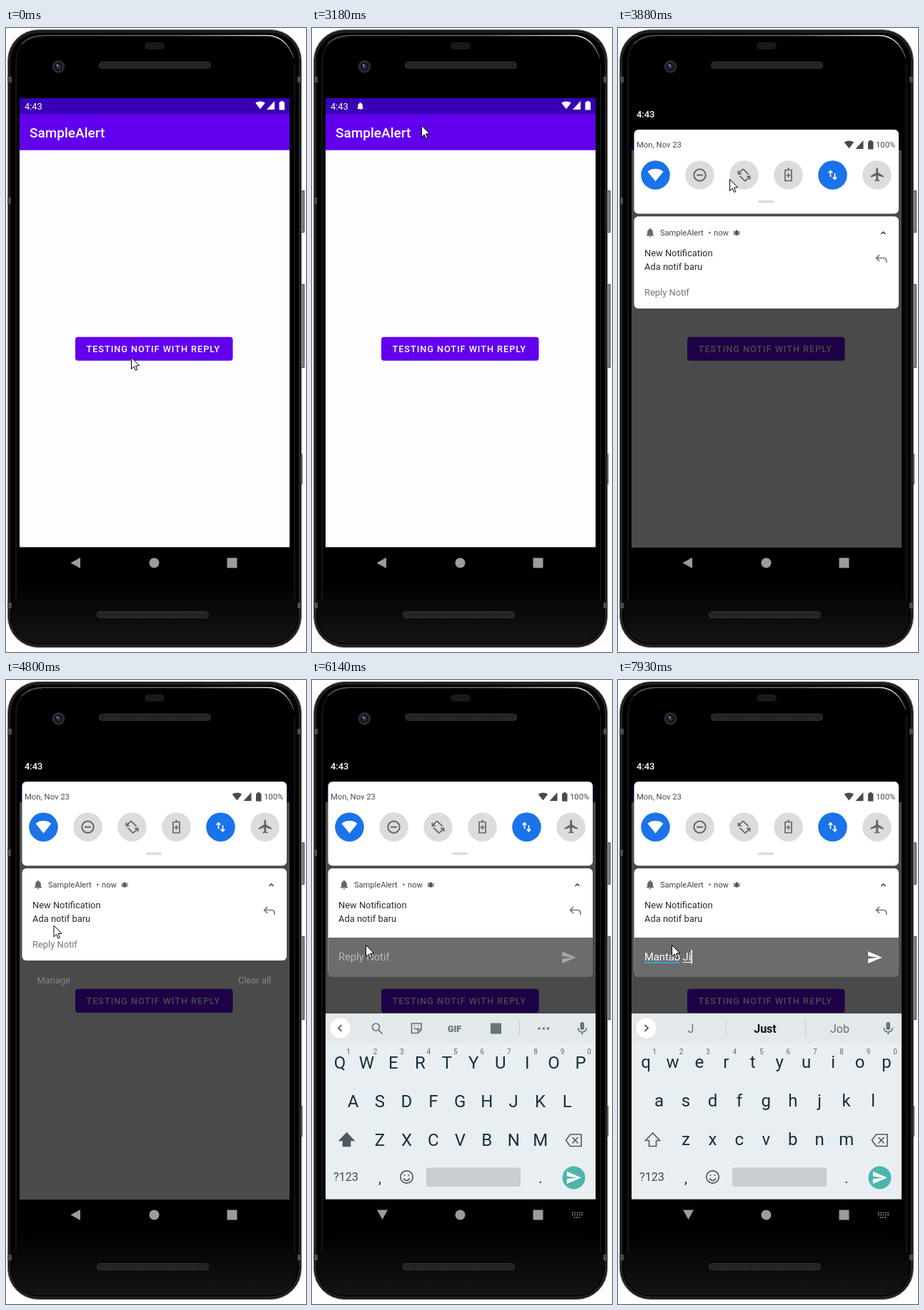
Recreate the animation shown at these times as an HTML page. Size 420x872 px, loop 8 s.

```html
<!DOCTYPE html>
<html lang="en">
<head>
<meta charset="utf-8">
<title>Notification with reply</title>
<style>
html, body { margin: 0; width: 100%; height: 100%; overflow: hidden; background: #fefefe; }
svg { display: block; width: 420px; height: 872px; font-family: Roboto, sans-serif; }
text { white-space: pre; }
.mid { text-anchor: middle; }
.line { fill: none; stroke-width: 2; }
.b13 { font-size: 12.9px; }
.b11 { font-size: 11.1px; }
</style>
</head>
<body>
<svg viewBox="0 0 420 872">
<defs>
  <path id="wifi" d="M12 21L23.6 6.6C20 3.6 16 2.5 12 2.5S4 3.6.4 6.6z"/>
  <path id="bell" d="M12 22a2 2 0 0 0 2-2h-4a2 2 0 0 0 2 2zm6-6v-5c0-3-1.6-5.6-4.5-6.3V4a1.5 1.5 0 0 0-3 0v.7C7.6 5.4 6 8 6 11v5l-2 2v1h16v-1z"/>
  <path id="send" d="M2 21L23 12 2 3v7l15 2-15 2z"/>
  <path id="plane" d="M21 16v-2l-8-5V3.5a1.5 1.5 0 0 0-3 0V9l-8 5v2l8-2.5V19l-2 1.5V22l3.5-1 3.5 1v-1.5L13 19v-5.5z"/>
  <path id="rotate" d="M4 7.600l5-5q1.400-1.200 2.800 0L20.200 11h-2.800l-7-7-5 5H8v2H2V5h2zM20 16.400V19h2v-6h-6v2h2.600l-5 5-7-7H3.800l8.400 8.400q1.400 1.200 2.800 0z"/>
  <g id="status">
    <use href="#wifi" transform="translate(349 101) scale(.58)"/>
    <path d="M365 114h11v-12z"/>
    <path d="M382.5 103.500h2V102h3.500v1.500h2V114.500h-7.500z"/>
  </g>
  <clipPath id="screenClip"><rect x="19" y="98" width="378" height="627.500"/></clipPath>
  <clipPath id="buttonClip"><rect x="97" y="431.700" width="220.500" height="33" rx="4"/></clipPath>
  <clipPath id="revealClip"><circle id="reveal" cx="75" cy="380"/></clipPath>
  <linearGradient id="topShade" x2="0" y2="1">
    <stop offset=".65"/><stop offset="1" stop-opacity=".3"/>
  </linearGradient>
  <linearGradient id="chin" x2="0" y2="1">
    <stop offset="0"/><stop offset="1" stop-color="#141414"/>
  </linearGradient>
  <linearGradient id="shine">
    <stop offset="0" stop-color="#555"/><stop offset=".6" stop-color="#777"/><stop offset=".95" stop-color="#eee"/><stop offset="1" stop-color="#444"/>
  </linearGradient>
  <pattern id="mesh" width="3" height="3" patternUnits="userSpaceOnUse">
    <rect width="3" height="3" fill="#2b2b2b"/><circle cx="1.500" cy="1.500" r="1" fill="#151515"/>
  </pattern>
</defs>

<g id="phone">
  <path d="M413 227.500h4.500v58H413zM413 358.500h4.500v116H413z" fill="#858585" stroke="#4a4a4a"/>
  <path d="M413 595h2v43h-2z" fill="#444"/>
  <rect x="2.500" y="2.500" width="411" height="863" rx="43" fill="#1b1b1b" stroke="#6a6a6a"/>
  <rect x="5.500" y="6" width="405" height="856" rx="40" stroke="#2e2e2e"/>
  <rect x="8" y="770" width="400" height="90" rx="37" fill="url(#chin)"/>
  <path d="M14 800V50Q14 12 50 12M404 800V50" fill="none" stroke="#151515" stroke-width="2"/>
  <path d="M22 22Q34 10.500 52 10.500H366Q392 11 403 42" fill="none" stroke="url(#shine)" stroke-width="1.300"/>
  <path d="M2 68h6v8H2zM408 68h6v8h-6zM2 237h5v9H2zM2 803h6v8H2zM408 803h6v8h-6z" fill="#4b4b4b"/>
  <rect x="194" y="20" width="28" height="10" rx="5" fill="#191919"/>
  <rect x="130.500" y="47.500" width="156" height="9" rx="4" fill="url(#mesh)" stroke="#333"/>
  <rect x="127.500" y="815.500" width="156" height="9" rx="4" fill="url(#mesh)" stroke="#333"/>
  <circle cx="73.500" cy="54" r="9" fill="#292929"/>
  <circle cx="73.500" cy="54" r="5.500" fill="#11111c"/>
  <circle cx="73.500" cy="54" r="3" fill="#34345c"/>
  <circle cx="72" cy="52" r="1.200" fill="#aab"/>
</g>

<g clip-path="url(#screenClip)">
  <g id="app">
    <rect x="19" y="98" width="378" height="628" fill="#fdfdfd"/>
    <rect x="19" y="98" width="378" height="22" fill="#3700b3"/>
    <rect x="19" y="120" width="378" height="50.700" fill="#6200ee"/>
    <g fill="#fff">
      <text x="26" y="114" font-size="12.900">4:43</text>
      <use href="#status"/>
      <use id="statusBell" href="#bell" transform="translate(61 102.500) scale(.55)"/>
      <text x="33" y="153" font-size="19" font-weight="500">SampleAlert</text>
    </g>
    <rect x="97" y="433" width="220.500" height="33" rx="4" opacity=".12"/>
    <rect x="97" y="431.700" width="220.500" height="33" rx="4" fill="#6200ee"/>
    <g clip-path="url(#buttonClip)"><circle id="ripple" cx="178" cy="460" fill="#fff"/></g>
    <text x="112.500" y="453" font-size="12.800" font-weight="500" letter-spacing=".93" fill="#fff">TESTING NOTIF WITH REPLY</text>
  </g>

  <g id="shade">
    <rect id="scrim" x="19" y="98" width="378" height="628"/>
    <rect id="topDark" x="19" y="98" width="378" height="73" fill="url(#topShade)"/>
    <text id="clock" x="26" y="125" font-size="12.900" font-weight="500" fill="#fff">4:43</text>

    <g id="quick">
      <rect x="22.500" y="142" width="370.500" height="117.600" rx="6" fill="#fff"/>
      <g fill="#4a4a4a">
        <text x="26" y="167" font-size="11.300">Mon, Nov 23</text>
        <use href="#status" transform="translate(-32.500 55)"/>
        <text x="361" y="167" font-size="11.300">100%</text>
      </g>
      <g id="tiles"></g>
      <use href="#wifi" transform="translate(41.200 194.500) scale(.94)" fill="#fff"/>
      <g class="line" stroke="#666">
        <circle cx="114.500" cy="205.500" r="8.200"/><path d="M110 205.500h9"/>
        <path d="M234 198.500h9v15h-9zM237 196.500h3M238.500 203v6M235.500 206h6" stroke-width="1.700"/>
        <path d="M297.500 208v-8M294.800 202.500l2.700-3 2.700 3M303.500 203v8M300.800 208.500l2.700 3 2.700-3" stroke="#fff" stroke-width="1.700"/>
      </g>
      <g fill="#666">
        <use href="#rotate" transform="translate(165.700 194.700) scale(.9)"/>
        <use href="#plane" transform="translate(351.800 193.500) scale(.95)"/>
      </g>
      <rect x="196" y="241" width="22" height="3.500" rx="1.700" fill="#dcdcdc"/>
    </g>

    <g id="notice">
      <rect id="card" x="22.500" y="263.300" width="370.500" rx="6" fill="#fff"/>
      <use id="cardBell" href="#bell" fill="#666"/>
      <g id="details" fill="#2a2a2a">
        <g class="b11" fill="#444">
          <text x="59" y="290">SampleAlert</text><text x="126.500" y="290">•</text><text x="134" y="290">now</text>
        </g>
        <use href="#bell" transform="translate(161 281) scale(.43)" fill="#555"/>
        <path d="M162.500 283.500v5M170 283.500v5" stroke="#555"/>
        <path class="line" d="M368.500 288l3-3 3 3" stroke="#333" style="stroke-width:1.400"/>
        <text class="b13" x="37" y="319">New Notification</text>
        <text class="b13" x="37" y="337.500">Ada notif baru</text>
        <path class="line" d="M366 317l-4.500 4.500 4.500 4.500M362 321.500h10q4 0 4 6.500" stroke="#757575" style="stroke-width:1.600"/>
        <text class="b13" id="action" x="37" y="374" fill="#757575">Reply Notif</text>
      </g>
    </g>

    <g id="footer" fill="#858585" class="b13">
      <text x="43.500" y="0">Manage</text><text x="325" y="0">Clear all</text>
    </g>

    <g id="input" clip-path="url(#revealClip)">
      <path d="M22.500 357h370.500v49q0 6-6 6H28.500q-6 0-6-6z" fill="#6c6c6c"/>
      <text id="hint" x="37" y="389" font-size="14.700" fill="#b9b9b9">Reply Notif</text>
      <text id="typed" x="37" y="389" font-size="14.700" fill="#fff"></text>
      <path id="doneLine" stroke="#35a5d8" stroke-width="2"/>
      <path id="wordLine" stroke="#fff" stroke-width="1"/>
      <rect id="caret" y="374" width="1.600" height="19.500" fill="#fff"/>
      <use id="inputSend" href="#send" transform="translate(348.300 373.500) scale(.93)"/>
    </g>
  </g>

  <g id="keyboard" fill="#17303c">
    <rect x="19" y="466" width="378" height="260" fill="#e9eef2"/>
    <rect x="19" y="466" width="378" height="41" fill="#e3e8eb"/>
    <circle cx="39.500" cy="486.500" r="14" fill="#fff"/>
    <path id="chevron" class="line" stroke="#444" style="stroke-width:1.700"/>
    <g id="tools" class="line" stroke="#66737b" style="stroke-width:1.700">
      <circle cx="89.500" cy="485" r="5"/><path d="M93 489l5.500 5.500"/>
      <path d="M139.500 480h13.500v9l-4.500 4.500h-9zM148.500 493v-4.500h4.500M143 486q3 4 6 0M143 483h1M148.500 483h1"/>
      <text x="190" y="491.500" font-size="12.500" font-weight="900" stroke="none" fill="#66737b">GIF</text>
      <rect x="250" y="479.500" width="15" height="15" fill="#66737b" stroke="none"/>
      <path d="M290.500 476v21" stroke="#c6cccf" stroke-width="1"/>
      <path d="M316.500 487h3M322.800 487h3M329 487h3" style="stroke-width:3"/>
    </g>
    <g id="words" class="mid" font-size="16" fill="#66737b">
      <text x="102" y="493"></text><text x="206" y="493" font-weight="700" fill="#111"></text><text x="310.500" y="493"></text>
      <path d="M151.500 475v22M262.500 475v22" stroke="#c6cccf"/>
    </g>
    <g fill="#66737b"><rect x="375.500" y="478" width="5.500" height="11" rx="2.700"/>
      <path class="line" d="M372.500 486q0 6 5.800 6t5.800-6M378.300 492v3.500" stroke="#66737b" style="stroke-width:1.600"/></g>
    <g id="keys" class="mid" font-size="24"></g>
    <g id="digits" class="mid" font-size="10" fill="#5c6a72"></g>
    <path id="shift" d="M48.500 633l-10 10.500h5v8h10v-8h5z" stroke="#4c5a62" stroke-width="1.600"/>
    <path class="line" d="M361.500 635H377v16.500h-15.500l-6-8.200zM364.500 639l8 8.500M372.500 639l-8 8.500" stroke="#4c5a62" style="stroke-width:1.600"/>
    <text x="30" y="700" font-size="16.200" fill="#3d4c54">?123</text>
    <text class="mid" x="95" y="703" font-size="20">,</text><text class="mid" x="320" y="703" font-size="20">.</text>
    <g class="line" stroke="#4c5a62" style="stroke-width:1.700"><circle cx="132.500" cy="694.500" r="8.700"/><path d="M128 696.500q4.500 6 9 0M128.500 692h2M134.500 692h2"/></g>
    <rect x="160" y="681.500" width="132" height="26.500" rx="3" fill="#c8cdd1"/>
    <circle cx="366.500" cy="695.500" r="16" fill="#4db6ac"/>
    <use href="#send" transform="translate(355 684) scale(.95)" fill="#fff"/>
  </g>
</g>

<g id="nav" fill="#9c9c9c">
  <path id="back"/>
  <circle cx="207.500" cy="747.500" r="7"/>
  <rect x="309.500" y="740.500" width="14" height="14"/>
  <path id="switcher" d="M364 744.500h15M364 747.500h15M366.500 751h10" stroke="#9c9c9c" stroke-width="1.700" stroke-dasharray="1.800 1.500"/>
</g>
<path id="cursor" d="M.5.5V16.500L4.200 13 6.500 18.500 8.800 17.500 6.500 12.200 11.500 11.700z" fill="#fff" stroke="#000"/>
</svg>

<script>
const LOOP = 8000;
const el = id => document.getElementById(id);
const set = (id, attrs) => { for (const k in attrs) el(id).setAttribute(k, attrs[k]); };
const show = (id, on) => set(id, { display: on ? "inline" : "none" });
const move = (id, x, y, scale = 1) => set(id, { transform: `translate(${x} ${y}) scale(${scale})` });

// Linear track of [time, ...values], held at both ends.
function track(t, keys) {
  const i = keys.findIndex(k => k[0] > t);
  if (i < 0) return keys[keys.length - 1].slice(1);
  if (i === 0) return keys[0].slice(1);
  const a = keys[i - 1], b = keys[i], f = (t - a[0]) / (b[0] - a[0]);
  return a.slice(1).map((v, j) => v + (b[j + 1] - v) * f);
}

const CURSOR = [[2245, 175, 460], [2630, 153, 114], [2880, 153, 114], [2950, 152, 111],
  [3105, 152, 111], [3410, 156, 211], [4035, 156, 211], [4500, 95, 295], [4880, 59, 355],
  [4900, 59, 355], [4970, 77, 365], [5120, 77, 365], [5200, 75, 370]];

// Time, finished words, current word, suggestions.
const TYPING = [
  [0, "", "", []],
  [6520, "", "M", ["M", "My", "Me"]],
  [6600, "", "Ma", ["Ma", "May", "Maybe"]],
  [6750, "", "Man", ["Man", "Many", "Main"]],
  [6980, "", "Mant", ["Mant", "Want", "Many"]],
  [7060, "", "Manta", ["Manta", "Mantra", ""]],
  [7230, "", "Mantab", ["Mantab", "Mantra", ""]],
  [7460, "Mantab ", "", ["and", "the", "is"]],
  [7780, "Mantab ", "J", ["J", "Just", "Job"]],
  [7930, "Mantab ", "Ji", ["J", "Just", "Job"]]];

const svgText = (x, y, s) => `<text x="${x}" y="${y}">${s}</text>`;
const STEP = 37.45;
const ROWS = [["qwertyuiop", 39, 543], ["asdfghjkl", 57.5, 597], ["zxcvbnm", 95, 651]];
el("keys").innerHTML = ROWS.map(([row, x, y]) =>
  [...row].map((c, i) => svgText(x + i * STEP, y, c)).join("")).join("");
el("digits").innerHTML = [..."1234567890"].map((c, i) => svgText(51 + i * STEP, 523, c)).join("");
el("tiles").innerHTML = [0, 1, 2, 3, 4, 5].map(i =>
  `<circle cx="${52.5 + 62 * i}" cy="205.500" r="20.300" fill="${i % 4 ? "#dcdcdc" : "#1a73e8"}"/>`).join("");
const keyLabels = [...el("keys").children];
const wordLabels = [...el("words").querySelectorAll("text")];

function drawShade(t) {
  show("shade", t >= 3730);
  const [open, dim] = track(t, [[3790, 0, .17], [3800, .75, .5], [3870, .75, .5], [3880, 1, .704]]);
  set("scrim", { opacity: dim });
  set("topDark", { opacity: .6 + .4 * open });
  show("clock", open > .9);
  move("quick", 0, -91 * (1 - open));
  move("notice", 0, -94 * (1 - open));
  const [grow] = track(t, [[5125, 0], [5350, 1]]);
  set("card", { height: 28.7 + 100 * open + 20 * grow });
  const size = .55 + .1 * open;
  move("cardBell", 45 - 12 * size, 277 + 9 * open - 12 * size, size);
  set("details", { opacity: open });
  show("action", t < 5280);
  const [fade] = track(t, [[4035, 0], [4340, 1]]);
  set("footer", { opacity: t < 5670 ? fade : 0 });
  move("footer", 0, 424 + 15.5 * grow);
}

function drawInput(t, done, word) {
  show("input", t >= 5200);
  move("input", 0, t < 5670 ? 0 : 3);
  set("reveal", { r: track(t, [[5125, 0], [5350, 345]])[0] });
  const typed = el("typed"), full = done + word;
  const widthOf = s => { typed.textContent = s; return s ? typed.getComputedTextLength() : 0; };
  const doneEnd = 37 + widthOf(done.trim()), wordStart = 37 + widthOf(done), end = 37 + widthOf(full);
  set("doneLine", { d: done ? `M37 392H${doneEnd}` : "" });
  set("wordLine", { d: word ? `M${wordStart} 391.500H${end}` : "" });
  show("hint", !full);
  set("inputSend", { fill: full ? "#fff" : "#a5a5a5" });
  set("caret", { x: end });
  show("caret", t < 5990 || t >= 6220);
}

function drawKeyboard(t, suggestions) {
  show("keyboard", t >= 5990);
  move("keyboard", 0, track(t, [[5915, 260], [6060, 60], [6140, 0]])[0]);
  const upper = t < 6520 || (t >= 7690 && t < 7780), typing = suggestions.length > 0;
  keyLabels.forEach(k => {
    k.textContent = upper ? k.textContent.toUpperCase() : k.textContent.toLowerCase();
  });
  move("keys", 0, upper ? 0 : -1);
  set("shift", { fill: upper ? "#4c5a62" : "none" });
  show("tools", !typing);
  show("words", typing);
  wordLabels.forEach((label, i) => { label.textContent = suggestions[i] || ""; });
  set("chevron", { d: typing ? "M37.500 482l4.500 4.500-4.500 4.500" : "M41.500 482l-4.500 4.500 4.500 4.500" });
}

function draw(t) {
  const [r, alpha] = track(t, [[1100, 0, .24], [1380, 200, .24], [1600, 200, 0]]);
  set("ripple", { r, opacity: alpha });
  show("statusBell", t >= 2090);
  const [, done, word, suggestions] = TYPING.filter(s => s[0] <= t).pop();
  drawShade(t);
  drawInput(t, done, word);
  drawKeyboard(t, suggestions);
  const keyboardMode = t >= 5670;
  set("back", { d: keyboardMode ? "M91 740.500h15l-7.500 13.500z" : "M90.500 747.500l13.500-7.500v15z" });
  show("switcher", keyboardMode);
  move("cursor", ...track(t, CURSOR));
}

const start = performance.now();
function frame() {
  draw((performance.now() - start) % LOOP);
  requestAnimationFrame(frame);
}
frame();
</script>
</body>
</html>
```
